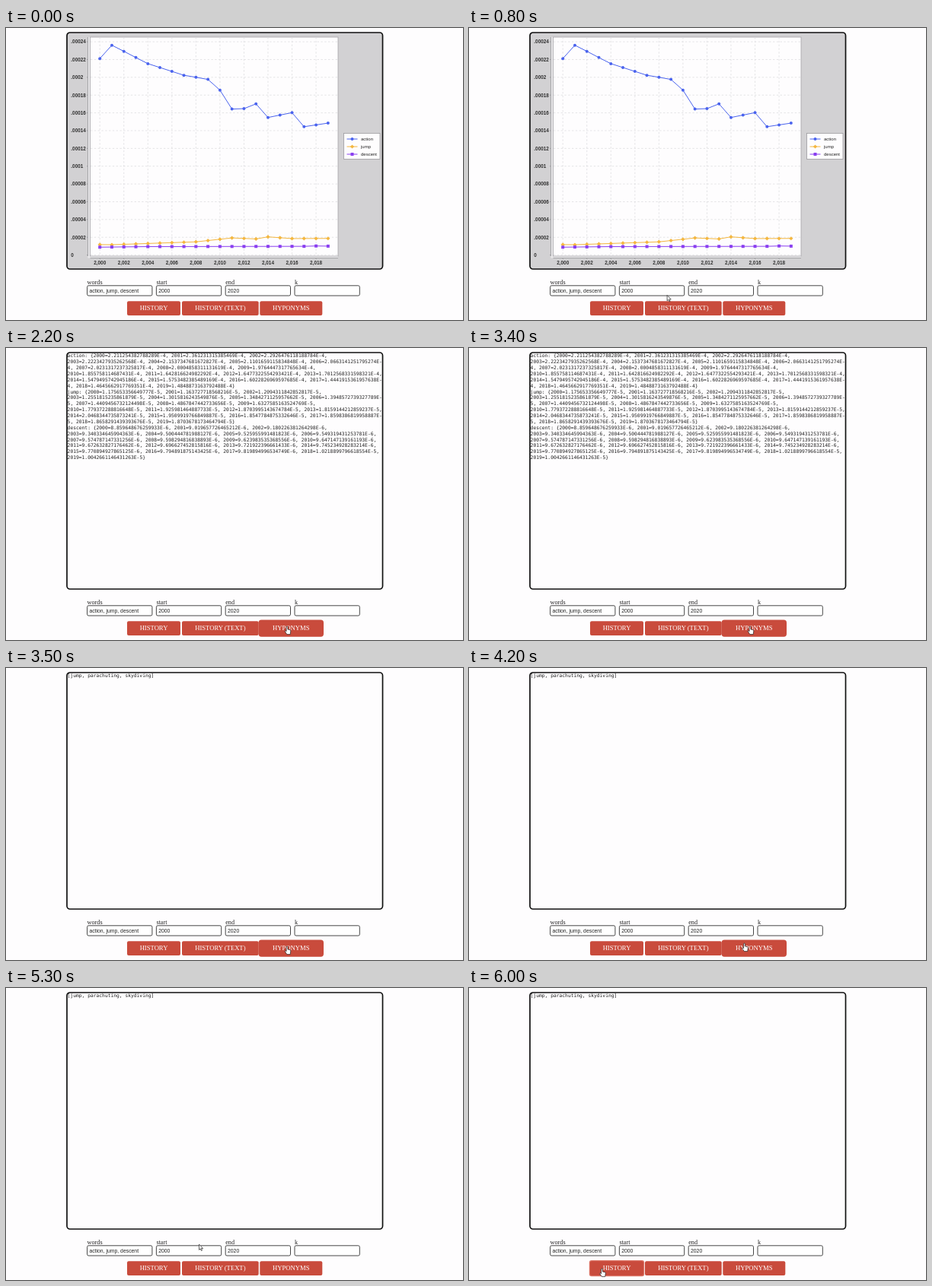
Animation, 600 px wide and 384 px high, one loop 6.1 s. Source, as an HTML page:

```html
<!DOCTYPE html>
<html lang="en">
<head>
<meta charset="utf-8">
<title>Word history</title>
<style>
  html, body { margin: 0; width: 100%; height: 100%; overflow: hidden; background: #fefdfe; }
  svg { display: block; position: absolute; left: 0; top: 0; width: 600px; height: 384px; }
  #output {
    position: absolute; left: 80.6px; top: 6.3px; width: 109.6ch;
    font: 6.31px/7.88px "DejaVu Sans Mono", monospace; color: #222;
  }
  .sans { font-family: "Liberation Sans", sans-serif; }
  .serif { font-family: "Liberation Serif", serif; }
  .tick { font-size: 6.4px; font-weight: bold; fill: #333; }
</style>
</head>
<body>
<svg id="stage" viewBox="0 0 600 384"></svg>
<div id="output"></div>
<script>
const LOOP = 6100, STEP = 100, YEARS = 20;
const TEXT_AT = 2200, LIST_AT = 3500;

// Each curve runs through a few [year, value] points; values are scaled by 10^-exp
const series = [
  { name: 'action', color: '#4a63ee', exp: 4, points: [
    [0, 2.211], [1, 2.361], [4, 2.153], [7, 2.023], [9, 1.976], [10, 1.855], [11, 1.642],
    [12, 1.647], [13, 1.701], [14, 1.547], [16, 1.602], [17, 1.444], [19, 1.484]] },
  { name: 'jump', color: '#f4b740', exp: 5, points: [
    [0, 1.175], [1, 1.163], [8, 1.486], [11, 1.925], [13, 1.815], [14, 2.046], [16, 1.854], [19, 1.87]] },
  { name: 'descent', color: '#8a3ff0', exp: 6, points: [
    [0, 8.859], [4, 9.5], [17, 9.819], [18, 10.21], [19, 10.036]] }
];

const buttons = [
  { label: 'HISTORY', x: 159, w: 70, spread: 1.2, glow: '#dc7466' },
  { label: 'HISTORY (TEXT)', x: 231, w: 100.7, spread: 1.7, glow: '#c94b3c' },
  { label: 'HYPONYMS', x: 333.3, w: 82, spread: 1.7, glow: '#c94b3c' }
];
const BUTTON_Y = 359.2, BUTTON_H = 18.8;

// Pointer tip: time, x, y
const path = [
  [100, 236, 300], [1000, 267, 366], [2100, 268.5, 366], [2200, 369, 366], [3900, 369, 366],
  [4200, 361.5, 362], [5300, 253.5, 337], [6000, 174.5, 369]
];

// Linear interpolation through rows of [key, ...values]
function sample(rows, key) {
  const next = rows.findIndex(row => row[0] >= key);
  if (next < 1) return rows[0].slice(1);
  const from = rows[next - 1], to = rows[next];
  const k = (key - from[0]) / (to[0] - from[0]);
  return from.slice(1).map((v, i) => v + (to[i + 1] - v) * k);
}

let seed = 7;
const randomDigit = () => {
  seed = (seed * 16807) % 2147483647;
  return seed % 9 + 1;
};

// Scientific notation with a long random tail of digits
function longNumber(value, exp, year) {
  const carry = value >= 10;
  const decimals = carry || (exp < 6 && year % 10 > 1) ? 16 : 15;
  let digits = (carry ? value / 10 : value).toFixed(3);
  while (digits.length < decimals + 2) digits += randomDigit();
  return `${digits}E-${carry ? exp - 1 : exp}`;
}

for (const s of series) {
  s.values = Array.from({ length: YEARS }, (_, year) =>
    longNumber(sample(s.points, year)[0], s.exp, year));
}

const rect = (x, y, w, h, attrs) => `<rect x="${x}" y="${y}" width="${w}" height="${h}" ${attrs}/>`;
const line = (x1, y1, x2, y2, attrs) => `<path d="M${x1} ${y1}L${x2} ${y2}" ${attrs}/>`;
const text = (x, y, str, attrs) => `<text x="${x}" y="${y}" ${attrs}>${str}</text>`;

const yearX = i => 123.2 + i * 15.77;
const valueY = v => 298.6 - v * 280.5 / 2.4e-4;

function marker(kind, x, y, color) {
  if (kind === 0) return `<circle cx="${x}" cy="${y}" r="2" fill="${color}"/>`;
  if (kind === 1) return `<path d="M${x} ${y - 2.6}l2.6 2.6-2.6 2.6-2.6-2.6z" fill="${color}"/>`;
  return rect(x - 2, y - 2, 4, 4, `fill="${color}"`);
}

function chart() {
  const grid = 'stroke="#dedee0" stroke-width=".8" stroke-dasharray="2.4 2.4"';
  const axis = 'stroke="#96969a" stroke-width=".8"';
  let out = rect(80, 6, 414.5, 311, 'rx="4" fill="#d2d1d3"')
    + rect(107.5, 12, 328.5, 290.5, 'fill="#e9e8ea"')
    + rect(110.5, 12, 325.5, 288, 'fill="#fefdfe" stroke="#a5a4a8" stroke-width=".8"')
    + line(107.5, 12, 107.5, 300, axis) + line(110.5, 302.5, 436, 302.5, axis);
  for (let i = 0; i <= 12; i++) {
    const y = valueY(i * 2e-5);
    const label = i ? (i * 2e-5).toFixed(5).slice(1).replace(/0$/, '') : '0';
    out += line(111, y, 436, y, grid) + line(106, y, 107.5, y, axis)
      + text(85.3, y + 2.3, label, 'class="sans tick"');
  }
  for (let i = 0; i < YEARS; i += 2) {
    const x = yearX(i);
    out += line(x, 12, x, 300, grid) + line(x, 302.5, x, 304, axis)
      + text(x, 310.6, `2,0${String(i).padStart(2, '0')}`, 'class="sans tick" text-anchor="middle"');
  }
  out += rect(443.4, 138.4, 47.6, 34.2, 'fill="#fefdfe" stroke="#9b9a9e" stroke-width=".8"');
  series.forEach((s, kind) => {
    const points = s.values.map((v, i) => [yearX(i), valueY(+v)]);
    const y = 146 + kind * 10;
    out += `<polyline points="${points.join(' ')}" fill="none" stroke="${s.color}"/>`
      + points.map(([px, py]) => marker(kind, px, py, s.color)).join('')
      + line(447.5, y, 461.5, y, `stroke="${s.color}"`) + marker(kind, 454.5, y, s.color)
      + text(466, y + 2, s.name, 'class="sans" font-size="6" fill="#222"');
  });
  return out;
}

function form() {
  const fields = [['words', 'action, jump, descent'], ['start', '2000'], ['end', '2020'], ['k', '']];
  return fields.map(([label, value], i) => {
    const x = 106.6 + i * 90.8;
    return text(x, 336.8, label, 'class="serif" font-size="8.2" fill="#222"')
      + rect(x, 338.8, 85.3, 13.2, 'rx="1.8" fill="#fff" stroke="#333" stroke-width=".9"')
      + text(x + 2.8, 347.7, value, 'class="sans" font-size="6.85" fill="#222"');
  }).join('');
}

const buttonMarkup = b =>
  rect(b.x, BUTTON_Y, b.w, BUTTON_H, `rx="2" fill="#c94b3c" stroke="${b.glow}" stroke-width="0" paint-order="stroke"`)
  + text(b.x + b.w / 2, 371.3, b.label, 'class="serif" font-size="8.65" fill="#fff" text-anchor="middle"');

const find = id => document.getElementById(id);
find('stage').innerHTML = `<g id="chart">${chart()}</g>`
  + rect(80, 6, 414.5, 311, 'rx="4" fill="none" stroke="#111" stroke-width="1.7"')
  + form()
  + `<g id="buttons">${buttons.map(buttonMarkup).join('')}</g>`
  + `<g id="pointer" fill="#fff" stroke="#222" stroke-width=".7" stroke-linejoin="round">
      <path id="arrow" d="M0 0v7.4l1.7-1.5 1.2 2.6 1.1-.5-1.1-2.5h2.2z"/>
      <path id="hand" d="M0 0q.9 0 .9 1v3l3 .7q1 .3.9 1.3l-.6 4.6h-4.4l-2.6-4q0-1.1 1.2-.7l.7.7V1q0-1 .9-1z"/>
    </g>`;

const chartNode = find('chart'), output = find('output');
const pointer = find('pointer'), arrow = find('arrow'), hand = find('hand');
const buttonRects = find('buttons').querySelectorAll('rect');
const show = (node, on) => { node.style.display = on ? '' : 'none'; };

// Lines may break after the exponent's minus sign
const historyText = series.map(s =>
  `${s.name}: {${s.values.map((v, i) => `${2000 + i}=${v}`).join(', ')}}`
).join('<br>').replace(/E-/g, 'E-<wbr>');
const listText = '[jump, parachuting, skydiving]';

let content = '';
function render(t) {
  show(chartNode, t < TEXT_AT);
  const wanted = t < TEXT_AT ? '' : t < LIST_AT ? historyText : listText;
  if (wanted !== content) output.innerHTML = content = wanted;

  const visible = t >= path[0][0];
  const [x, y] = sample(path, t);
  const hovered = visible && y >= BUTTON_Y
    ? buttons.findIndex(b => x >= b.x && x <= b.x + b.w) : -1;
  buttonRects.forEach((node, i) =>
    node.setAttribute('stroke-width', i === hovered ? buttons[i].spread * 2 : 0));
  show(pointer, visible);
  show(hand, hovered >= 0);
  show(arrow, hovered < 0);
  pointer.setAttribute('transform', `translate(${x} ${y})`);
}

const start = performance.now();
function tick() {
  const t = (performance.now() - start) % LOOP;
  render(Math.floor(t / STEP) * STEP);
  requestAnimationFrame(tick);
}
render(0);
requestAnimationFrame(tick);
</script>
</body>
</html>
```
